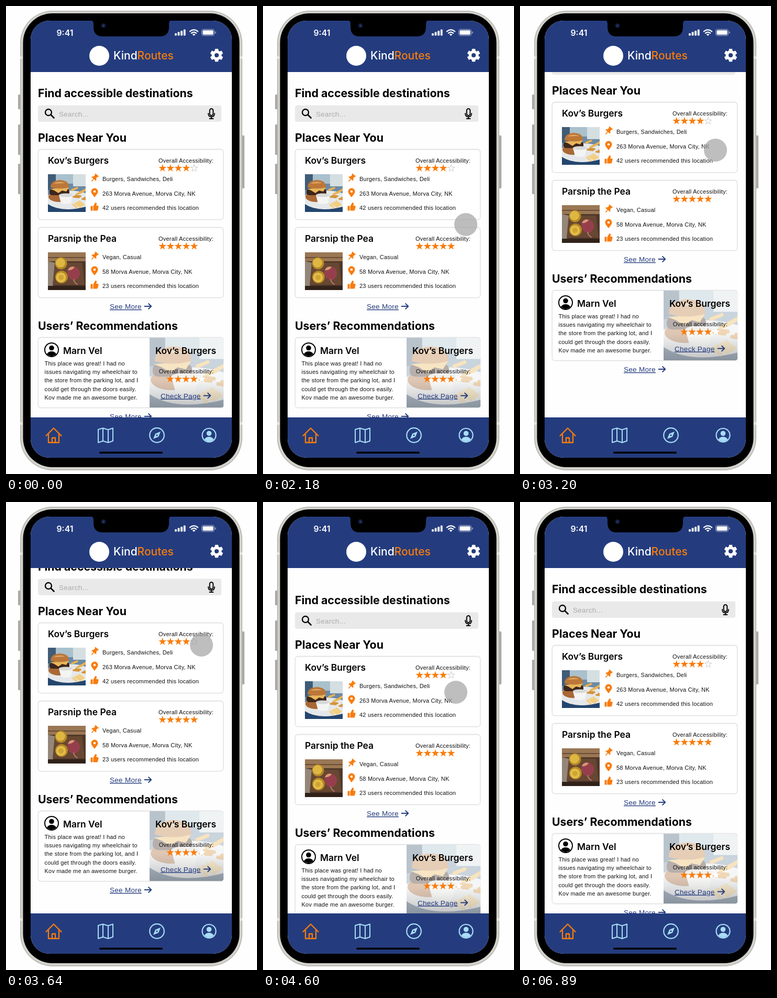
Recreate the animation shown at these times as an HTML page. Size 479 px wide and 893 px high, loop 7.8 s.

```html
<!DOCTYPE html>
<html lang="en">
<head>
<meta charset="utf-8">
<title>Accessible destinations</title>
<style>
html, body { margin: 0; width: 100%; height: 100%; overflow: hidden; background: #fefefe; }
svg { display: block; width: 479px; height: 893px; }
text { font: 11px "Liberation Sans", Arial, sans-serif; letter-spacing: .22px; fill: #111; }
.heading { font: 700 21.3px Inter, sans-serif; letter-spacing: 0; fill: #000; }
.title { font: 600 17.4px Inter, sans-serif; letter-spacing: 0; fill: #000; }
.brand { font: 500 21px Inter, sans-serif; letter-spacing: 0; fill: #fff; }
.clock { font: 600 15.8px Inter, sans-serif; letter-spacing: 0; fill: #fff; }
.link, .hint { font-size: 13.5px; letter-spacing: .3px; }
.link { fill: #243c7e; text-decoration: underline; }
.hint { fill: #aaa; }
.mid { text-anchor: middle; }
.line { fill: none; stroke-linecap: round; stroke-linejoin: round; }
</style>
</head>
<body>
<svg id="stage" viewBox="0 0 479 893"></svg>
<script>
const BLUE = '#243c7e', ORANGE = '#f97c0c', SKY = '#a9dcf5';
const LOOP = 7800;
const stage = document.getElementById('stage');

const label = (x, y, words, cls = '') => `<text x="${x}" y="${y}" class="${cls}">${words}</text>`;
const box = (x, y, w, h, fill, r = 0, more = '') =>
  `<rect x="${x}" y="${y}" width="${w}" height="${h}" rx="${r}" fill="${fill}" ${more}/>`;
const dot = (x, y, r, fill, more = '') => `<circle cx="${x}" cy="${y}" r="${r}" fill="${fill}" ${more}/>`;
const stroke = (d, color, width) => `<path class="line" d="${d}" stroke="${color}" stroke-width="${width}"/>`;
const icon = (id, x, y) => `<use href="#${id}" x="${x}" y="${y}"/>`;

function star(cx, cy, r, fill, edge) {
  const points = Array.from({ length: 10 }, (_, i) => {
    const a = i * Math.PI / 5 - Math.PI / 2, d = i % 2 ? r * .39 : r;
    return `${(cx + d * Math.cos(a)).toFixed(2)},${(cy + d * Math.sin(a)).toFixed(2)}`;
  }).join(' ');
  return `<polygon points="${points}" fill="${fill}" stroke="${edge}" stroke-width=".6"/>`;
}

function stars(x, y, count, edge = '#aaa') {
  return [0, 1, 2, 3, 4].map(i => i < count
    ? star(x + i * 15.1, y, 7.7, ORANGE, 'none')
    : star(x + i * 15.1, y, 7, '#fff', edge)).join('');
}

const cardFrame = y => box(60.5, y - .5, 355, 136, '#e9e9e9', 6) +
  box(61.5, y + 1, 353, 133.5, '#fff', 5, 'stroke="#dedede"');

function place({ y, name, photo, score, kind, address, fans }) {
  return cardFrame(y) +
    label(80, y + 28, name, 'title') +
    label(291, y + 26, 'Overall Accessibility:') +
    stars(298.7, y + 36.5, score) +
    `<use href="#${photo}" transform="translate(80 ${y + 48})"/>` +
    icon('pin', 169, y + 55) + icon('spot', 169, y + 84) + icon('thumb', 169, y + 110) +
    label(184, y + 61, kind) +
    label(184, y + 89, address) +
    label(184, y + 116, `${fans} users recommended this location`);
}

const link = (x, y, words, arrowX) => label(x, y, words, 'link') + icon('arrow', arrowX, y - 5);

const person = (x, y, color, width) =>
  dot(x, y, 13, 'none', `stroke="${color}" stroke-width="${width}"`) +
  dot(x, y - 3.5, 4.8, color) +
  `<path d="M${x - 9} ${y + 8}Q${x - 6} ${y + 3} ${x} ${y + 3}T${x + 9} ${y + 8}Q${x} ${y + 16} ${x - 9} ${y + 8}Z" fill="${color}"/>`;

const fries = Array.from({ length: 13 }, (_, i) => {
  const x = 46 + (i * 7) % 25, y = 30 + (i * 11) % 31;
  return stroke(`M${x} ${y}l${10 - i % 4} ${i % 3 * 5 - 4}`, ['#e9b352', '#d4933a', '#f4ce7c'][i % 3], 3.6);
}).join('');

const defs = `<defs>
  <clipPath id="square"><rect width="72" height="72"/></clipPath>
  <clipPath id="viewport"><rect x="47" y="126" width="384" height="659"/></clipPath>
  <clipPath id="screen"><rect x="47" y="28" width="384" height="834" rx="36"/></clipPath>
  <clipPath id="review"><path d="M274 633H410Q415 633 415 638V761Q415 766 410 766H274Z"/></clipPath>
  <linearGradient id="shade" x2="0" y2="1"><stop offset=".6" stop-opacity="0"/><stop offset="1" stop-opacity=".22"/></linearGradient>
  <g id="pin"><path transform="rotate(40)" d="M-4.2-7.5H4.2V-5.5H3V-1.5L5.5 1.2V2.5H.8V8L0 9L-.8 8V2.5H-5.5V1.2L-3-1.5V-5.5H-4.2Z" fill="${ORANGE}"/></g>
  <g id="spot"><path d="M0 8C-4 3-6.5 0-6.5-3A6.5 6.5 0 0 1 6.5-3C6.5 0 4 3 0 8Z" fill="${ORANGE}"/>${dot(0, -3, 2.3, '#fff')}</g>
  <g id="thumb">${box(-7.5, -1.5, 4, 9, ORANGE, .5)}<path d="M-2.5-1L1.5-8Q4.5-8 4-5L3.2-2H6.5Q8-1.5 7.5.5L6 6.5Q5.5 7.5 4.5 7.5H-2.5Z" fill="${ORANGE}"/></g>
  <g id="arrow">${stroke('M0 0H12.5M7.5-5L12.8 0L7.5 5', BLUE, 1.8)}</g>
  <g id="burger" clip-path="url(#square)">
    ${box(0, 0, 72, 72, '#6c8aa3')}
    ${box(0, 0, 72, 18, '#a9c0cd')}${box(0, 0, 15, 30, '#405c76')}${box(48, 0, 24, 23, '#d5dfe2')}
    <ellipse cx="40" cy="51" rx="47" ry="20" fill="#e5e8ea"/>
    <path d="M0 57Q26 74 72 62V72H0Z" fill="#24466e"/>
    ${fries}
    <ellipse cx="21" cy="43" rx="20" ry="10" fill="#a96835"/>
    ${box(3, 28, 38, 12, '#3d261c', 5)}
    <path d="M4 28L40 25L35 33L27 31L20 36L12 31Z" fill="#e9b65a"/>
    <path d="M5 25Q5 12 23 11Q41 12 40 25Q22 30 5 25Z" fill="#bc7738"/>
    <path d="M11 18Q20 12 33 17Q22 17 11 18Z" fill="#dfab6c"/>
    <path d="M21 40H47L44 55Q34 59 25 55Z" fill="#f4f4f3"/>
    <ellipse cx="34" cy="40" rx="13" ry="3.5" fill="#d7d9d8"/>
  </g>
  <g id="beets" clip-path="url(#square)">
    ${box(0, 0, 72, 72, '#50382a')}
    ${box(0, 0, 72, 17, '#9a7755')}${box(0, 9, 72, 2, '#6a4d37')}
    <path d="M0 17L14 20L9 72H0Z" fill="#94877a"/><path d="M13 20H65L70 62H9Z" fill="#674731"/>
    ${box(0, 64, 72, 8, '#302219')}
    ${dot(25, 21, 11.5, '#b58725')}${dot(24, 20, 9, '#deb743')}
    ${dot(26, 47, 12, '#b58925')}${dot(25, 48, 9.5, '#e2bd49')}${dot(25, 48, 5, '#d0a432')}
    <path d="M37 35Q42 24 53 28Q62 32 61 43Q58 53 49 53Q36 50 37 35Z" fill="#963f4c"/>
    <path d="M38 34Q42 25 51 28Q47 35 38 34Z" fill="#d99876"/>
    ${stroke('M49 52Q51 59 56 61', '#b8797b', 2)}
  </g>
</defs>`;

const review = [
  'This place was great! I had no',
  'issues navigating my wheelchair to',
  'the store from the parking lot, and I',
  'could get through the doors easily.',
  'Kov made me an awesome burger.'
];

const page = `<g clip-path="url(#viewport)"><g id="page">
  ${label(61, 174, 'Find accessible destinations', 'heading')}
  ${box(61, 189.5, 350, 31.5, '#e9e9e9', 4)}
  ${dot(81, 203, 6, 'none', 'stroke="#000" stroke-width="2.3"')}${stroke('M86 208L91.5 213.5', '#000', 2.6)}
  ${label(101, 211, 'Search...', 'hint')}
  ${box(388.7, 196, 6.6, 13, 'none', 3.3, 'stroke="#000" stroke-width="2"')}
  ${stroke('M386 205Q386 211.5 392 211.5T398 205M392 212V215M388.5 215H395.5', '#000', 1.8)}
  ${label(61, 259, 'Places Near You', 'heading')}
  ${place({ y: 273, name: 'Kov’s Burgers', photo: 'burger', score: 4, kind: 'Burgers, Sandwiches, Deli',
    address: '263 Morva Avenue, Morva City, NK', fans: 42 })}
  ${place({ y: 422, name: 'Parsnip the Pea', photo: 'beets', score: 5, kind: 'Vegan, Casual',
    address: '58 Morva Avenue, Morva City, NK', fans: 23 })}
  ${link(198, 578, 'See More', 264.5)}
  ${label(61, 618, 'Users’ Recommendations', 'heading')}
  ${cardFrame(632)}
  ${person(87, 656, '#000', 2)}
  ${label(109, 664, 'Marn Vel', 'title')}
  ${review.map((words, i) => label(73.5, 686 + i * 16.2, words)).join('')}
  <g clip-path="url(#review)">
    <use href="#burger" transform="translate(274 628) scale(1.98)"/>
    ${box(274, 632, 142, 136, '#fff', 0, 'opacity=".63"')}${box(274, 632, 142, 136, 'url(#shade)')}
  </g>
  ${label(343, 664, 'Kov’s Burgers', 'title mid')}
  ${label(344, 700.5, 'Overall accessibility:', 'mid')}
  ${stars(313.3, 712, 4, '#fff')}
  ${link(295, 748.5, 'Check Page', 377.5)}
  ${link(198, 788, 'See More', 264.5)}
</g></g>`;

const sideButtons = [[23, 169, 28], [23, 226, 58], [23, 301, 58], [450, 247, 101]]
  .map(([x, y, h]) => box(x, y, 5, h, '#aaa9a4', 1.5)).join('');
const antennaBands = [[27, 96], [445.5, 96], [27, 794], [445.5, 794]]
  .map(([x, y]) => box(x, y, 5.5, 5, '#e4e3de')).join('');

const phone = sideButtons +
  box(27, 9, 424, 877, '#b5b4ae', 62) +
  box(28.5, 10.5, 421, 874, '#d3d2cc', 60.5) + antennaBands +
  box(32.5, 14, 413, 866, '#000', 56) +
  box(47, 28, 384, 834, '#fefefe', 36);

const gearTeeth = [0, 60, 120, 180, 240, 300]
  .map(a => box(-3.3, -12.3, 6.6, 6, '#fff', 1, `transform="rotate(${a})"`)).join('');

const header = `<g clip-path="url(#screen)">${box(47, 28, 384, 98, BLUE)}${box(47, 785, 384, 77, BLUE)}</g>
  <path d="M162 27Q167 28 167 34V40Q167 58 185 58H293Q311 58 311 40V34Q311 28 316 27Z" fill="#000"/>
  ${dot(186, 37.5, 4.5, '#101a38')}${dot(186, 37.5, 2, '#24396d')}
  ${label(96.5, 57, '9:41', 'clock')}
  ${[0, 1, 2, 3].map(i => box(322 + i * 5.6, 52 - i * 2.4, 3.8, 4.5 + i * 2.4, '#fff', 1)).join('')}
  ${stroke('M350.8 48.6Q358.5 42.2 366.2 48.6M353.8 51.8Q358.5 48 363.2 51.8', '#fff', 2.2)}
  <path d="M355.5 54Q358.5 52 361.5 54L358.5 57Z" fill="#fff"/>
  ${box(373.5, 44.5, 24, 12, 'none', 3.5, 'stroke="#a7b1cc"')}${box(375.3, 46.3, 20.4, 8.4, '#fff', 2)}${box(399, 48.5, 1.5, 4, '#a7b1cc', .7)}
  ${dot(178, 95, 19, '#fff')}
  <text x="205" y="102" class="brand">Kind<tspan fill="${ORANGE}">Routes</tspan></text>
  <g transform="translate(402 94)">${gearTeeth}${dot(0, 0, 6.8, 'none', 'stroke="#fff" stroke-width="5.4"')}</g>`;

const nav = stroke('M76.5 820L91 805.5L105.5 820M81 817V833H101V817M88 833V824H94V833', ORANGE, 2.3) +
  stroke('M176 808L185 805.5L195 808.5L204 805.5V830L195 833L185 830L176 833ZM185 805.5V830M195 808.5V833', SKY, 2) +
  dot(288, 819, 13.8, 'none', `stroke="${SKY}" stroke-width="2.2"`) +
  `<path d="M295 812L291 822L281 826L285 816Z" fill="${SKY}"/>` + dot(288, 819, 1.6, BLUE) +
  person(387.5, 819, SKY, 2.2) +
  box(178, 850.5, 121, 3.5, '#000', 1.7);

stage.innerHTML = defs + phone + page + header + nav +
  dot(0, 0, 22, '#a3a3a3', 'id="touch" opacity=".7"');

// Time, scroll offset, touch x, touch y
const keys = [
  [1250, 0, 470, 448], [1370, 0, 432, 441], [1640, 0, 401, 430], [2040, 0, 389, 424],
  [2180, 0, 387, 417], [2300, -6, 386, 411], [2540, -34, 381, 383], [2780, -63, 377, 332],
  [3080, -87, 373, 281], [3200, -90, 373, 275], [3350, -69, 373, 274], [3500, -49, 373, 273],
  [3640, -43, 373, 273], [3910, -42, 373, 274], [4150, -28, 372, 288], [4300, -13, 371, 303],
  [4450, 5, 370, 328], [4600, 21, 368, 363], [4720, 21, 368, 367], [4870, 13, 368, 372],
  [5020, 3, 369, 380], [5170, 1, 370, 389], [5300, 0, 371, 405], [5770, 0, 376, 478],
  [6040, 0, 376, 518], [6190, 0, 376, 528], [6490, 0, 377, 531], [6740, 0, 412, 579]
];

const gaps = [12, 15, 12, 15, 12, 13, 14, 12, 12, 12, 12, 12, 15, 15, 12, 15, 15, 14, 12, 15, 12,
  12, 15, 15, 15, 12, 15, 15, 15, 12, 12, 12, 12, 12, 15, 12, 15, 15, 15, 13, 12, 15];
const ticks = [1250];
for (const gap of gaps) ticks.push(ticks[ticks.length - 1] + gap * 10);
const END = ticks[ticks.length - 1];

function sample(t) {
  const next = keys.findIndex(key => key[0] > t);
  if (next < 0) return keys[keys.length - 1];
  const a = keys[next - 1], b = keys[next], k = (t - a[0]) / (b[0] - a[0]);
  return a.map((v, i) => v + (b[i] - v) * k);
}

const pageGroup = document.getElementById('page');
const touch = document.getElementById('touch');

function draw(time) {
  const active = time >= ticks[0] && time < END;
  touch.style.display = active ? '' : 'none';
  const tick = active ? ticks.filter(t => t <= time).pop() : ticks[0];
  const [, scroll, x, y] = sample(tick);
  pageGroup.setAttribute('transform', `translate(0 ${Math.round(scroll)})`);
  touch.setAttribute('transform', `translate(${x} ${y})`);
}

const start = performance.now();
function loop() {
  draw((performance.now() - start) % LOOP);
  requestAnimationFrame(loop);
}
loop();
</script>
</body>
</html>
```
